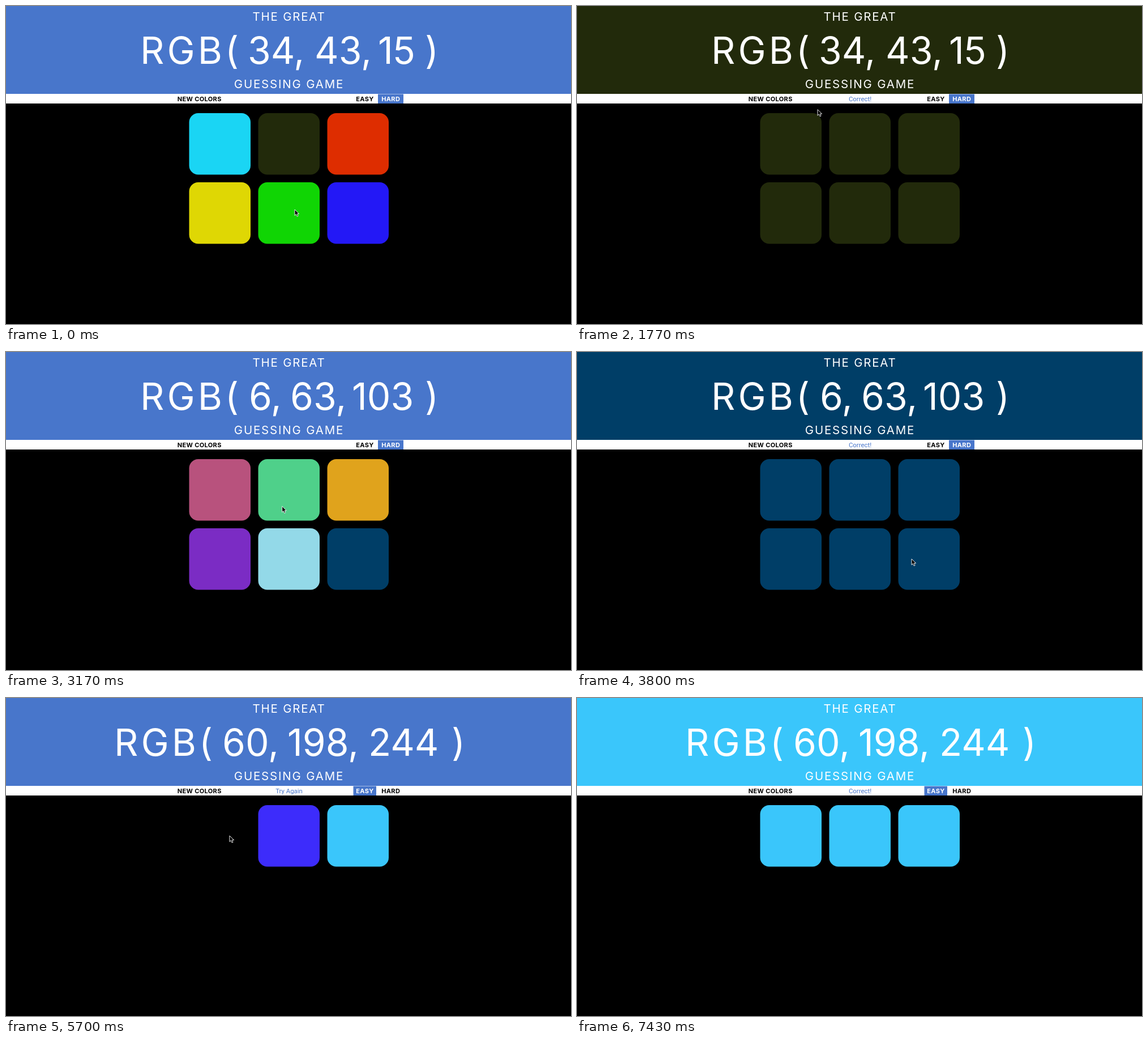
Animation of 998x561 px, one loop 7930 ms. Source, as an HTML page:

```html
<!DOCTYPE html>
<html>
<head>
<meta charset="utf-8">
<title>Colour guessing game</title>
<style>
  html, body { margin: 0; width: 100%; height: 100%; overflow: hidden; background: #000; }
  svg { display: block; width: 998px; height: 561px; }
  text { font-family: Inter, sans-serif; fill: #fff; white-space: pre; }
  .sub { font-size: 20.5px; letter-spacing: 1.8px; text-anchor: middle; }
  .big { font-size: 66px; }
  .rgb { letter-spacing: 5px; }
  .button { font-size: 11px; font-weight: 700; letter-spacing: .35px; text-anchor: middle; }
  .message { font: 11.4px Roboto, sans-serif; fill: #4876cb; text-anchor: middle; }
</style>
</head>
<body>
<svg id="stage" viewBox="0 0 998 561">
  <rect id="header" width="998" height="155"/>
  <rect y="155" width="998" height="17" fill="#fff"/>
  <text class="sub" x="500" y="26">THE GREAT</text>
  <g id="title"></g>
  <text class="sub" x="500" y="144.5">GUESSING GAME</text>
  <text id="message" class="message" x="500" y="167.5"></text>
</svg>
<script>
const LOOP = 7930, FADE = 40, BLUE = '#4876cb';
const DARK = '#222a0b', NAVY = '#003e67', SKY = '#3ac6fb';
const stage = document.getElementById('stage');
const header = document.getElementById('header');
const title = document.getElementById('title');
const message = document.getElementById('message');

function add(tag, attrs, parent = stage, text = '') {
  const el = document.createElementNS('http://www.w3.org/2000/svg', tag);
  for (const key in attrs) el.setAttribute(key, attrs[key]);
  el.textContent = text;
  parent.append(el);
  return el;
}

// Each title is a row of [word, x].
const titles = [
  [['RGB(', 237], ['34,', 427], ['43,', 545], ['15', 657], [')', 740]],
  [['RGB(', 237], ['6,', 429], ['63,', 502], ['103', 611], [')', 740]],
  [['RGB(', 191], ['60,', 382], ['198,', 497], ['244', 640], [')', 787]]
].map(words => {
  const g = add('g', {}, title);
  words.forEach(([word, x], i) => add('text', { class: i ? 'big' : 'big rgb', x, y: 101.5 }, g, word));
  return g;
});

const buttons = [['NEW COLORS', 296.5, 90], ['EASY', 613.5, 40.5], ['HARD', 657, 45]].map(([label, x, w]) => ({
  x, w,
  box: add('rect', { x, y: 155.5, width: w, height: 16.5, fill: BLUE }),
  text: add('text', { class: 'button', x: x + w / 2 + .2, y: 167.5 }, stage, label)
}));

const squares = Array.from({ length: 6 }, (_, i) => add('rect', {
  x: 323.5 + i % 3 * 122, y: 189 + (i > 2) * 122, width: 108.5, height: 108.5, rx: 16
}));

const cursor = add('path', {
  d: 'M0 0V10.5L2.4 8.3L4.1 12.2L6 11.4L4.4 7.6H7.7Z',
  fill: '#000', stroke: '#fff', 'stroke-width': .9
});

const fill = (color, count) => squares.map((_, i) => i < count ? color : '#000');
const correct = (color, count = 6) => ({ header: color, colors: fill(color, count), message: 'Correct!' });
const wrong = index => ({ hide: index, message: 'Try Again' });

// Each click changes part of the state before it.
const states = [];
for (const [time, change] of [
  [-FADE, { header: BLUE, title: 0, level: 2, message: '',
    colors: ['#1ad5f4', '#222a0b', '#de2d00', '#dfd704', '#10d504', '#2318f6'] }],
  [110, wrong(4)],
  [825, correct(DARK)],
  [2720, { header: BLUE, title: 1, message: '',
    colors: ['#b8527d', '#4fd08a', '#e0a31c', '#7b2cc4', '#93d9e8', NAVY] }],
  [3640, correct(NAVY)],
  [4840, { header: BLUE, title: 2, level: 1, message: '',
    colors: ['#c3c4f5', '#3d2cfb', SKY, '#000', '#000', '#000'] }],
  [5520, wrong(0)],
  [6020, wrong(1)],
  [6760, correct(SKY, 3)]
]) {
  const state = { ...states.at(-1), ...change, time };
  if ('hide' in change) state.colors = state.colors.with(change.hide, '#000');
  states.push(state);
}

// Pointer stops: time, x, y.
const path = [
  [0, 510, 359], [250, 510, 359], [700, 505, 273], [1150, 505, 273], [1600, 440, 188],
  [2200, 364, 161], [2800, 364, 161], [3500, 591, 365], [4050, 591, 365], [4700, 632, 167],
  [4960, 632, 167], [5440, 378, 243], [5620, 378, 243], [5960, 496, 243], [6120, 496, 243],
  [6460, 610, 240], [6880, 610, 240], [7270, 640, -20], [LOOP, 640, -20]
];

function pointer(t) {
  const i = path.findIndex(stop => stop[0] > t);
  const [t0, x0, y0] = path[i - 1], [t1, x1, y1] = path[i];
  const p = (t - t0) / (t1 - t0), e = p * p * (3 - 2 * p);
  return [x0 + (x1 - x0) * e, y0 + (y1 - y0) * e];
}

function draw(now) {
  const t = now % LOOP;
  const n = states.findLastIndex(s => s.time <= t);
  const state = states[n], before = states[Math.max(0, n - 1)];
  const p = Math.min(1, (t - state.time) / FADE) * 100;
  const [x, y] = pointer(t);

  header.setAttribute('fill', state.header);
  titles.forEach((g, i) => g.setAttribute('display', i === state.title ? 'inline' : 'none'));
  message.textContent = state.message;
  squares.forEach((sq, i) => {
    sq.style.fill = `color-mix(in srgb, ${state.colors[i]} ${p}%, ${before.colors[i]})`;
  });
  buttons.forEach((b, i) => {
    const hover = x >= b.x && x <= b.x + b.w && y >= 155 && y <= 172;
    const lit = hover || i === state.level;
    b.box.setAttribute('visibility', lit ? 'visible' : 'hidden');
    b.text.style.fill = lit ? '#fff' : '#000';
  });
  cursor.setAttribute('transform', `translate(${x} ${y})`);
  requestAnimationFrame(frame);
}

const start = performance.now();
function frame() { draw(performance.now() - start); }
frame();
</script>
</body>
</html>
```
